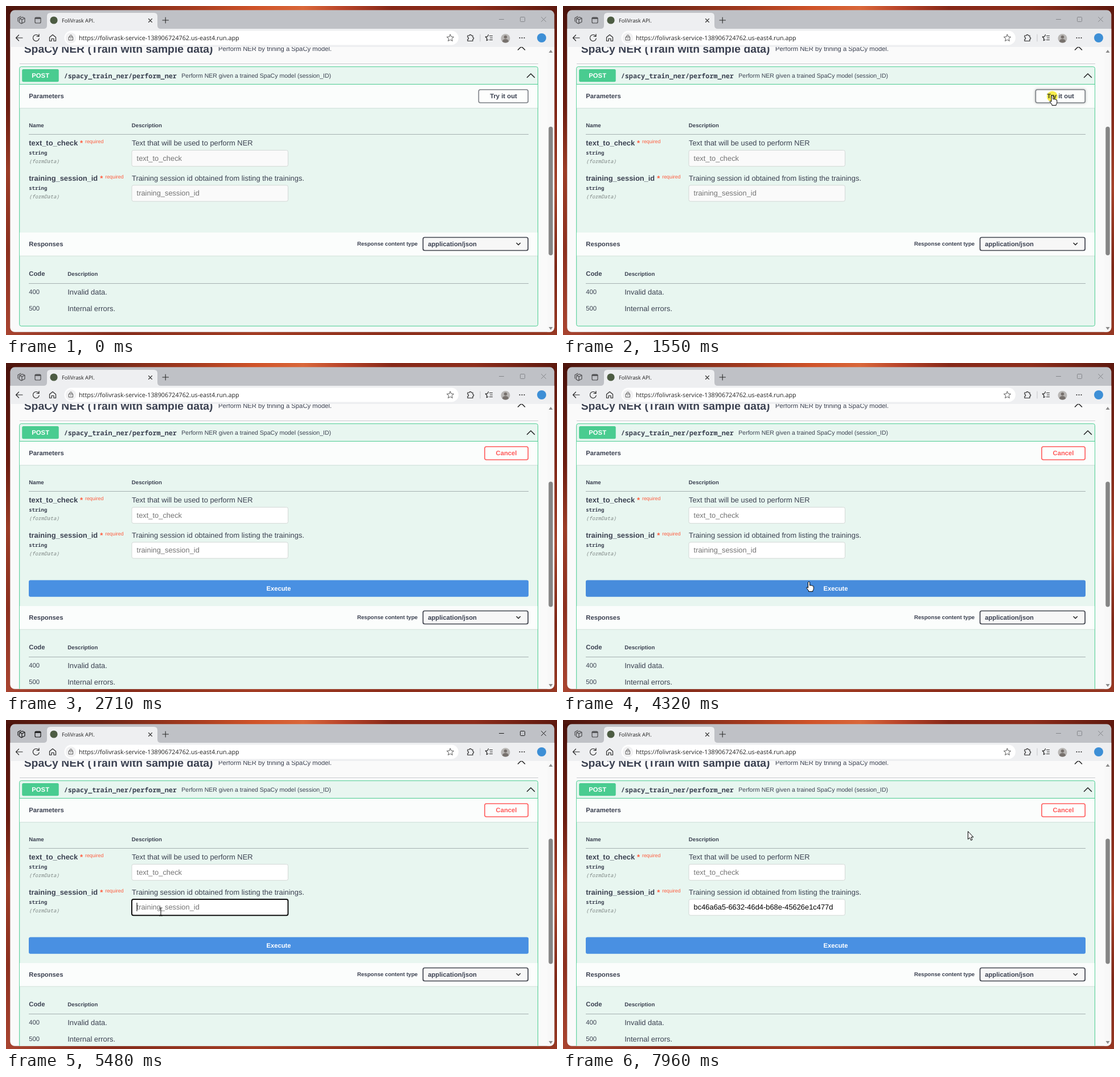
Recreate the animation shown at these times as an HTML page. Size 968 by 578 pixels, loop 8000 ms.

```html
<!DOCTYPE html>
<html lang="en">
<head>
<meta charset="utf-8">
<title>API page</title>
<style>
html, body { margin: 0; width: 100%; height: 100%; overflow: hidden; }
svg { display: block; width: 968px; height: 578px; }
text { font-family: "Liberation Sans", Arial, sans-serif; white-space: pre; text-rendering: geometricPrecision; }
.b { font-weight: 700; }
.m { font-family: "Noto Sans Mono", monospace; font-weight: 700; }
.u { font-family: "Open Sans", sans-serif; }
.i { font-style: italic; font-weight: 500; }
.mid { text-anchor: middle; }
.line { fill: none; stroke-linecap: round; stroke-linejoin: round; }
#click { mix-blend-mode: multiply; }
</style>
</head>
<body>
<svg id="stage" viewBox="0 0 968 578"></svg>
<script>
const LOOP = 8000, INK = '#3b4151', GREEN = '#49cc90';
const BASE = 11.27, SMALL = 9.66, LARGE = 12.88;

const text = (x, y, size, str, cls = '', fill = INK, id = '') =>
  `<text id="${id}" x="${x}" y="${y}" font-size="${size}" class="${cls}" fill="${fill}">${str}</text>`;
const rect = (x, y, w, h, fill, attrs = '') =>
  `<rect x="${x}" y="${y}" width="${w}" height="${h}" fill="${fill}" ${attrs}/>`;
const line = (d, stroke, width = 1, attrs = '') =>
  `<path class="line" d="${d}" stroke="${stroke}" stroke-width="${width}" ${attrs}/>`;
const circle = (x, y, r, fill, attrs = '') =>
  `<circle cx="${x}" cy="${y}" r="${r}" fill="${fill}" ${attrs}/>`;
const gradient = (id, vertical, stops) =>
  `<linearGradient id="${id}" x2="${vertical ? 0 : 1}" y2="${vertical ? 1 : 0}">` +
  stops.map(([at, color]) => `<stop offset="${at}" stop-color="${color}"/>`).join('') + '</linearGradient>';

const sectionHead = (y, h, title) =>
  rect(24, y + h, 910, 1.2, '#d3e2dc') + rect(24, y, 910, h, '#fbfdfc') +
  text(40.3, y + 24.3, BASE, title, 'b');

const parameter = (y, name, star, description, i) =>
  text(40.3, y, LARGE, name, 'b') +
  text(star, y, LARGE, '*', 'b', '#ff5a3c') +
  text(star + 9, y - 4.4, 8.8, 'required', '', '#ff5a3c') +
  text(40.3, y + 16, 8.9, 'string', 'm') +
  text(40.3, y + 31, 8.9, '(formData)', 'm i', '#7d8583') +
  text(221, y, LARGE, description) +
  rect(221, y + 8, 274.5, 28.3, '#fff', `id="field${i}" rx="3" stroke="#d3d8d6"`) +
  text(229.6, y + 26.2, LARGE, name, '', '#757575', 'value' + i);

const defs = '<defs>' +
  gradient('top', false, [[0, '#4e150d'], [.17, '#6d2517'], [.33, '#a23a1f'], [.45, '#cf5329'],
    [.54, '#d9673a'], [.61, '#b9452a'], [.7, '#862818'], [.85, '#8d2d1b'], [1, '#5e190f']]) +
  gradient('left', true, [[0, '#4a120b'], [.3, '#6d1d11'], [.5, '#9b3c26'], [.75, '#8d301f'], [1, '#a84430']]) +
  gradient('right', true, [[0, '#5e190f'], [.3, '#802617'], [.55, '#a5422a'], [.8, '#7e2717'], [1, '#963823']]) +
  gradient('bottom', false, [[0, '#a84430'], [.2, '#852c1b'], [.45, '#a33d24'], [.7, '#8c2e1b'], [1, '#963823']]) +
  '<clipPath id="view"><path d="M7.5 72H951V572.5H15a7.5 7.5 0 0 1-7.5-7.5Z"/></clipPath></defs>';

const desktop = rect(0, 0, 968, 9, 'url(#top)') + rect(0, 564, 968, 14, 'url(#bottom)') +
  rect(0, 7, 15, 565, 'url(#left)') + rect(953, 7, 15, 565, 'url(#right)');

const browser =
  rect(7.3, 7.3, 956, 565.5, '#bfc1c6', 'rx="8"') +
  '<path d="M7.3 40H66Q72 40 72 34V18Q72 12 78 12H260Q266 12 266 18V34Q266 40 272 40H963.3V72H7.3Z" fill="#eeeff1"/>' +
  '<g id="tabIcons" class="line" stroke-width="1.2">' +
  '<path d="M24 22L29 19.5 33 21.5V28L27 31 23 28.5ZM24 22L28 24 33 21.5M28 24V30M21 27V21L26 18.3"/>' +
  '<rect x="51" y="20" width="10" height="10" rx="2"/><path d="M52 21.5H60" stroke-width="2.6"/></g>' +
  circle(84, 25, 6.6, '#4d5c43') +
  text(98, 28.5, 9.3, 'FoliVrask API.', 'u', '#1d1d1d') +
  line('M250.5 22.5l6 6m0-6l-6 6M275 25H285.5M280.2 20V30', '#2b2b2b', 1.1) +
  '<g id="windowButtons" class="line"><path d="M866.5 23.5H874.5M940.5 19.5l8 8m0-8l-8 8"/>' +
  '<rect x="903.5" y="19.5" width="8" height="8" rx="1"/></g>' +
  rect(102.5, 43.5, 692.5, 25, '#fff', 'rx="12.5"') +
  circle(114, 56, 9.5, '#f1f1f2') +
  line('M29 56H18M22.5 51L17.5 56 22.5 61M57.5 53A5.5 5.5 0 1 0 58.3 57M58 49.5V53.5H54' +
    'M76.5 55L82 50.5 87.5 55V61.5H84V57.5H80V61.5H76.5Z', '#2b2b2b', 1.2) +
  line('M110.5 54.5H117.5V60H110.5ZM112 54V53a2 2 0 0 1 4 0V54', '#555', 1) +
  circle(114, 57.2, .8, '#555') +
  text(128, 59.7, 10.75, 'https://folivrask-service-138906724762.us-east4.run.app', 'u', '#222') +
  line('M780.5 50l1.8 4 4.3.4-3.3 2.9 1 4.3-3.8-2.3-3.8 2.3 1-4.3-3.3-2.9 4.3-.4Z', '#555', 1) +
  line('M811 52H814a1.7 1.7 0 0 1 3.4 0H820V55a1.7 1.7 0 0 1 0 3.4V61.5H811V58.4a1.7 1.7 0 0 0 0-3.4Z', '#2b2b2b', 1.2) +
  line('M833 50V62', '#c4c5c8') +
  line('M847.5 50.5l-1.6 3.2-3.6.5 2.6 2.5-.6 4 2.6-1.5M849.5 52.5H854.5M850.5 56H854.5M849.5 59.5H854.5', '#2b2b2b', 1.2) +
  circle(877.5, 57, 8, '#b9b7b5') + circle(877.5, 54.5, 2.8, '#77716d') +
  '<path d="M872 62.5a5.5 4.5 0 0 1 11 0Q877.5 66.5 872 62.5Z" fill="#77716d"/>' +
  [902.5, 906.5, 910.5].map(x => circle(x, 56, 1, '#222')).join('') +
  circle(941, 56, 8, '#3d8fd6');

const page = rect(7, 72, 945, 501, '#fafafa') +
  text(31.7, 82, 19.33, 'SpaCy NER (Train with sample data)', 'b') +
  text(373, 79, 11.27, 'Perform NER by trining a SpaCy model.') +
  line('M899.5 77L905.5 71 911.5 77', '#222', 1.5) +
  rect(24, 101, 911, 1, '#c9cbd0') +
  rect(23.7, 106.7, 910.7, 455.6, '#e8f6f0', `id="block" rx="3" stroke="${GREEN}"`) +
  rect(24, 137, 910, 1, GREEN) +
  rect(28.2, 111, 64.5, 22.3, GREEN, 'rx="2.5"') +
  text(60.7, 126, BASE, 'POST', 'b mid', '#fff') +
  text(101.7, 126.8, 11.8, '/spacy_train_ner/perform_ner', 'm') +
  text(308.3, 126, 10.54, 'Perform NER given a trained SpaCy model (session_ID)') +
  line('M915.5 125.5L922 119 928.5 125.5', '#222', 1.5) +
  sectionHead(138, 41, 'Parameters') +
  rect(830.4, 147, 86.8, 23, '#fdfefd', 'id="button" rx="3" stroke-width="1.6"') +
  text(874, 162.3, BASE, 'Try it out', 'b mid', INK, 'buttonText') +
  text(40.3, 213.3, SMALL, 'Name', 'b') + text(220.8, 213.3, SMALL, 'Description', 'b') +
  rect(40, 225, 878, 1, '#a5b0b1') +
  parameter(245.4, 'text_to_check', 130, 'Text that will be used to perform NER', 0) +
  parameter(306.9, 'training_session_id', 165.3, 'Training session id obtained from listing the trainings.', 1) +
  rect(0, 321, 1, 15, '#000', 'id="caret"') +
  '<g id="execute">' + rect(40, 381.5, 878, 29.2, '', 'id="executeFill" rx="3"') +
  text(479, 400.2, BASE, 'Execute', 'b mid', '#fff') + '</g>' +
  '<g id="responses">' + sectionHead(398, 40.5, 'Responses') +
  text(617, 421.3, SMALL, 'Response content type', 'b') +
  rect(732.6, 406.5, 184.5, 23, '#f7f7f7', 'rx="3" stroke="#41444e" stroke-width="1.7"') +
  text(741.2, 422, BASE, 'application/json', 'b') +
  line('M897 416.5L900.2 419.7 903.4 416.5', '#222', 1.5) +
  text(40.3, 474.3, BASE, 'Code', 'b') + text(108.3, 473.5, SMALL, 'Description', 'b') +
  rect(40, 487, 878, 1, '#a5b0b1') +
  text(40.3, 506, BASE, '400') + text(108.3, 506.8, LARGE, 'Invalid data.') +
  text(40.3, 535, BASE, '500') + text(108.3, 535.8, LARGE, 'Internal errors.') + '</g>';

const scrollbar =
  '<path d="M951 72H963.3V565a8 8 0 0 1-8 7.800H951Z" fill="#f8f8f8"/>' +
  '<path d="M953.5 82L957 77 960.5 82ZM953.5 564L957 569 960.5 564Z" fill="#8a8a8a"/>' +
  rect(953.3, 212, 7.4, 226, '#858585', 'id="thumb" rx="3.7"');

const cursors = circle(0, 0, 9.5, '#f9ee4e', 'id="click"') +
  '<g id="cursor" stroke="#000" stroke-width="1" stroke-linejoin="round" fill="#fff">' +
  '<path id="arrow" d="M.5 .7V14.6L3.6 11.7 5.7 16.4 8 15.4 6 10.8H10Z"/>' +
  '<path id="hand" d="M-1.5 0Q0-2 1.5 0V6Q3 4.6 4 6 5.6 5 6.3 6.8 8 6.2 8.3 8V11.5Q8 14 6.8 15V16.5H-.5V15L-4 10.5Q-4.6 8.6-2.8 9L-1.5 10.2Z"/>' +
  '<path id="beam" fill="none" d="M-2.5-7H-.7L0-6.3.7-7H2.5M0-6.3V6.3M-2.5 7H-.7L0 6.3.7 7H2.5"/></g>';

document.getElementById('stage').innerHTML =
  defs + desktop + browser + `<g clip-path="url(#view)">${page}</g>` + scrollbar + cursors;

const $ = id => document.getElementById(id);
const set = (id, attrs) => { for (const k in attrs) $(id).setAttribute(k, attrs[k]); };
const show = (id, on) => set(id, { visibility: on ? 'visible' : 'hidden' });
const within = (t, ...spans) => spans.some(([a, b]) => t >= a && t < b);
const mix = (a, b, p) => a + (b - a) * p;

// start, end, steps, from x, y, to x, y
const moves = [
  [70, 200, 2, 872, 530, 656, 356],
  [590, 1140, 8, 656, 356, 859.5, 158],
  [1620, 2170, 8, 859.5, 158, 765, 250],
  [4320, 5080, 11, 432, 385, 272, 337],
  [5480, 6170, 10, 272, 337, 614, 300],
  [7960, 8000, 1, 711, 195, 711, 195]
];

function pointer(t) {
  const [start, end, steps, x0, y0, x1, y1] = moves.filter(m => m[0] <= t).pop() || moves[0];
  const step = Math.floor((t - start) / (end - start) * steps + .3);
  const p = 1 - (1 - Math.min(1, Math.max(0, step / steps))) ** 1.4;
  return [mix(x0, x1, p), mix(y0, y1, p)];
}

function render(t) {
  const opened = t >= 1620, pasted = t >= 5550;
  const active = within(t, [1620, 2710], [5220, 6770]);
  const focused = within(t, [5220, 6700]);
  const visible = within(t, [70, 2710], [4320, 6770], [7960, LOOP]);
  const [x, y] = pointer(t);
  const inBox = (l, top, r, b) => visible && x > l && x < r && y > top && y < b;
  const overButton = inBox(opened ? 840 : 830, 147, 918, 171);
  const overExecute = opened && inBox(40, 381, 918, 411);
  const overField = opened && (inBox(221, 253, 496, 282) || inBox(221, 315, 496, 344));

  set('windowButtons', { stroke: active ? '#1a1a1a' : '#85878b' });
  set('tabIcons', { stroke: active ? '#151515' : '#4b4b4d' });

  const red = Math.min(1, Math.max(0, (t - 1680) / 300));
  const blend = (from, to) => `rgb(${from.map((v, i) => Math.round(mix(v, to[i], red)))})`;
  const danger = [255, 90, 90];
  set('button', {
    x: opened ? 841 : 830.4, width: opened ? 76.2 : 86.8, stroke: blend([122, 126, 132], danger),
    style: overButton ? 'filter:drop-shadow(0 0 2px rgba(0,0,0,.3))' : ''
  });
  set('buttonText', { x: opened ? 879 : 874, fill: blend([59, 65, 81], danger) });
  $('buttonText').textContent = opened ? 'Cancel' : 'Try it out';

  show('execute', opened);
  set('executeFill', { fill: overExecute ? '#478cdc' : '#4990e2' });
  set('responses', { transform: `translate(0 ${opened ? 29 : 0})` });
  set('block', { height: opened ? 484.6 : 455.6 });
  set('thumb', { y: opened ? 208.5 : 212, height: opened ? 220 : 226 });

  const fill = opened ? '#fff' : '#fafafa';
  set('field0', { fill });
  set('field1', { fill, stroke: focused ? '#101010' : '#d3d8d6', 'stroke-width': focused ? 2 : 1 });
  $('value1').textContent = pasted ? 'bc46a6a5-6632-46d4-b68e-45626e1c477d' : 'training_session_id';
  set('value1', { fill: pasted ? '#000' : '#757575' });
  const blinkStart = pasted ? 5550 : 5220;
  show('caret', focused && (t - blinkStart) % 1000 < 500);
  set('caret', { x: pasted ? 476.5 : 229.5 });

  const kind = overField ? 'beam' : overButton || overExecute ? 'hand' : 'arrow';
  for (const id of ['arrow', 'hand', 'beam']) show(id, visible && id === kind);
  set('cursor', { transform: `translate(${x} ${y})` });
  set('click', { cx: x, cy: y + 1 });
  show('click', within(t, [1550, 1620], [5150, 5220], [6630, 6700]));
}

const began = performance.now();
(function tick() {
  render((performance.now() - began) % LOOP);
  requestAnimationFrame(tick);
})();
</script>
</body>
</html>
```
